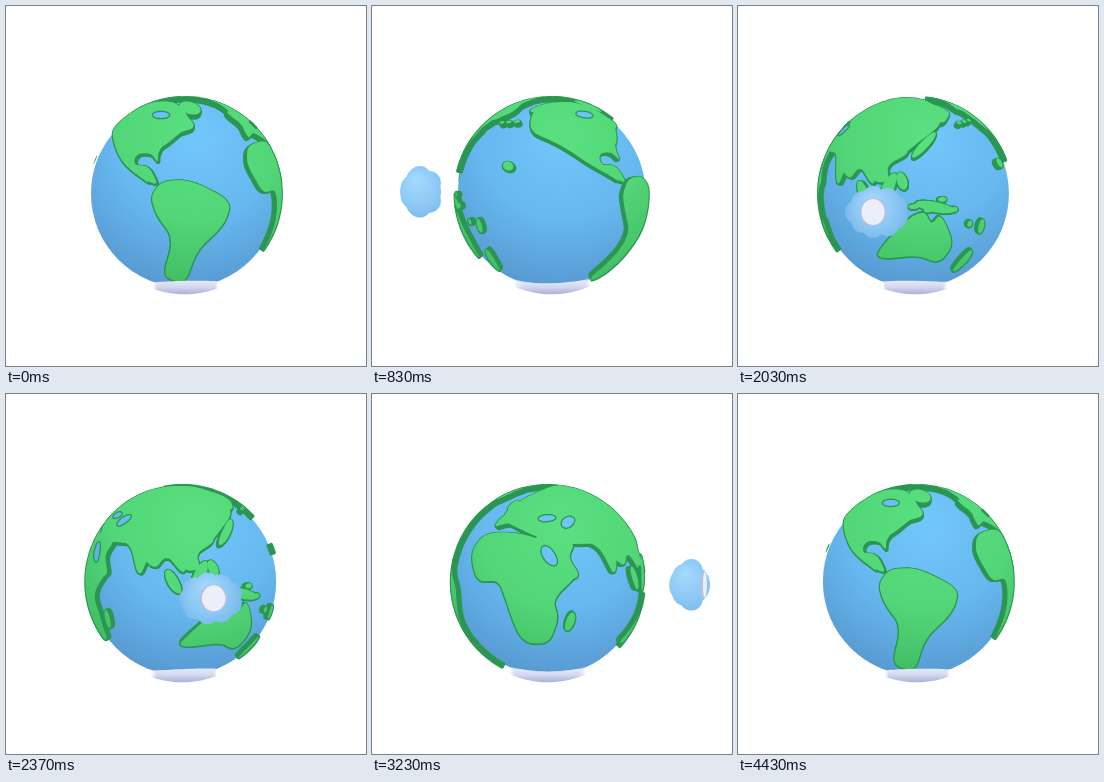
Recreate the animation shown at these times as an HTML page with a canvas. Size 360 px wide and 360 px high, loop 4460 ms.

```html
<!DOCTYPE html>
<html lang="en">
<head>
<meta charset="utf-8">
<title>Turning globe</title>
<style>
html, body { margin: 0; width: 100%; height: 100%; overflow: hidden; background: #fff; }
canvas { display: block; width: 100vw; height: 100vh; }
</style>
</head>
<body>
<canvas id="stage" width="360" height="360"></canvas>
<script>
const ctx = document.getElementById('stage').getContext('2d');
const STEPS = 134, LOOP = 4460, TAU = Math.PI * 2;
const CY = 187.5, SEA = 93.8, TOP = 97, TILT = 0.068;
const ST = Math.sin(TILT), CT = Math.cos(TILT);
const lands = [], lakes = [];

const turnOf = step => step / STEPS * TAU;

// The globe spins about an axis slightly off its middle
const middle = turn => 177.7 + 2 * Math.cos(turn - 1);

function spinY([x, y, z], a) {
  const c = Math.cos(a), s = Math.sin(a);
  return [x * c + z * s, y, z * c - x * s];
}

// Stage position at a given turn step -> point on the unit globe
function lift(step, px, py) {
  const turn = turnOf(step);
  let x = (px - middle(turn)) / TOP, y = (CY - py) / TOP;
  const d = Math.max(1, Math.hypot(x, y) / 0.999);
  x /= d;
  y /= d;
  const z = Math.sqrt(1 - x * x - y * y);
  return spinY([x, y * CT + z * ST, z * CT - y * ST], -turn);
}

// Corner cutting keeps coasts soft
function smooth(pts) {
  return pts.flatMap((p, i) => {
    const q = pts[(i + 1) % pts.length];
    return [0.2, 0.8].map(k => {
      const v = p.map((c, j) => c + (q[j] - c) * k), n = Math.hypot(...v);
      return v.map(c => c / n);
    });
  });
}

function land(step, ...xy) {
  const pts = [];
  for (let i = 0; i < xy.length; i += 2) pts.push(lift(step, xy[i], xy[i + 1]));
  lands.push(smooth(smooth(smooth(pts))));
}

function oval(step, x, y, rx, ry = rx, lean = 0) {
  const c = Math.cos(lean), s = Math.sin(lean);
  return Array.from({ length: 20 }, (_, i) => {
    const u = rx * Math.cos(i / 20 * TAU), v = ry * Math.sin(i / 20 * TAU);
    return lift(step, x + u * c - v * s, y + u * s + v * c);
  });
}
const isle = (...o) => lands.push(oval(...o));
const lake = (...o) => lakes.push(oval(...o));

// North America, east and west, with Greenland
land(0, 108,122, 133,101, 168,96, 178,107, 191,122, 166,129, 152,146, 152,157, 145,147,
  127,148, 126,159, 143,160, 153,180, 135,172, 117,157, 108,136);
land(25, 154,106, 183,112, 190,134, 224,161, 251,179, 228,157, 227,148, 245,140, 240,115, 205,97, 172,98);
isle(0, 184, 102, 11, 6, 0.3);
lake(0, 155, 109, 8, 3);
// South America
land(0, 145,190, 156,175, 184,174, 225,195, 219,217, 190,244, 178,277, 157,270, 168,232, 150,208);
// Africa and Madagascar
land(113, 155,161, 166,142, 206,139, 236,147, 247,170, 262,175, 246,203, 247,222, 231,248,
  210,248, 206,208, 198,187, 171,190);
isle(82, 136, 227, 4, 9);
// Europe and Arabia
land(113, 175,135, 178,123, 192,117, 192,97, 222,102, 252,126, 263,147, 238,150, 226,138, 192,129);
land(82, 112,138, 144,148, 133,163, 142,182, 128,187, 117,158);
isle(113, 181, 112, 4, 5);
lake(113, 223, 123, 6, 3);
lake(113, 239, 126, 3, 6, -0.5);
lake(113, 240, 160, 4, 11, -0.6);
// Asia, middle and east, with Japan
land(82, 136,150, 166,150, 181,186, 190,160, 206,160, 225,181, 225,163, 240,150, 240,116,
  205,94, 155,96, 105,122, 112,141);
land(61, 100,150, 110,128, 140,104, 180,95, 213,106, 206,118, 192,113, 166,136, 171,148,
  149,159, 151,175, 138,177, 122,160, 111,175);
isle(61, 186, 139, 4, 17, 0.75);
// Southern islands
isle(61, 164, 175, 5, 9, -0.3);
isle(61, 197, 201, 20, 5, 0.2);
isle(82, 215, 187, 5, 13, -0.5);
isle(82, 237, 183, 5, 18, 0.2);
for (let i = 0; i < 4; i++) isle(46, 115 + 12 * i, 199 + 6 * Math.sin(2.4 * i), 4, 2.5);
// Australia and the Pacific
land(46, 103,233, 113,209, 124,204, 131,218, 138,207, 158,238, 153,257, 128,247, 106,249);
isle(46, 180, 256, 5, 11, 0.4);
isle(46, 187, 222, 4, 7);
isle(46, 171, 219, 3);
isle(46, 221, 160, 6, 4, 0.5);
for (let i = 0; i < 3; i++) isle(46, 183 + 9 * i, 118 - i, 3, 1.5);

const cap = Array.from({ length: 60 }, (_, i) => {
  const a = i / 60 * TAU, r = 0.39 + 0.04 * Math.cos(2 * a - 0.35);
  return [r * Math.sin(a), -Math.sqrt(1 - r * r), r * Math.cos(a)];
});

function blend(g, ...colors) {
  colors.forEach((c, i) => g.addColorStop(i / (colors.length - 1), c));
  return g;
}
const glow = (...colors) => blend(ctx.createRadialGradient(190, 132, 10, 190, 132, 155), ...colors);
const sea = glow('#70c5f9', '#66b8ef', '#5798d0');
const grass = glow('#59df7f', '#52d677', '#40bb63');
const ice = blend(ctx.createLinearGradient(0, 273, 0, 289), '#e9edf8', '#d3d9ee', '#a4add6');
const cliff = '#2b9652';

function view(pts, turn) {
  return pts.map(p => {
    const [x, y, z] = spinY(p, turn);
    return [x, y * CT - z * ST, y * ST + z * CT];
  });
}

// Points past the limb slide onto it when hugging
function trace(pts, cx, r, hug, drop = 0) {
  ctx.beginPath();
  for (const [x, y, z] of pts) {
    const k = hug && z < 0 ? r / Math.hypot(x, y) : r;
    ctx.lineTo(cx + x * k, CY - y * k + drop);
  }
  ctx.closePath();
}

function disc(x, y, rx, ry, fill) {
  ctx.beginPath();
  ctx.ellipse(x, y, rx, ry, 0, 0, TAU);
  ctx.fillStyle = fill;
  ctx.fill();
}

function drawGlobe(turn) {
  const cx = middle(turn);
  const all = lands.map(p => view(p, turn));
  const facing = pts => pts.some(p => p[2] > 0);
  const front = all.filter(facing);
  ctx.lineJoin = 'round';

  ctx.fillStyle = ctx.strokeStyle = cliff;
  for (const pts of all) { trace(pts, cx, TOP - 1); ctx.fill(); }
  disc(cx, CY, SEA, SEA, sea);

  ctx.lineWidth = 2.6;
  ctx.fillStyle = cliff;
  for (let r = SEA - 1; r < TOP; r++) {
    for (const pts of front) {
      trace(pts, cx, r, true, 0.5);
      ctx.fill();
      ctx.stroke();
    }
  }
  ctx.fillStyle = grass;
  for (const pts of front) { trace(pts, cx, TOP, true); ctx.fill(); }

  ctx.fillStyle = sea;
  for (const pts of lakes.map(p => view(p, turn)).filter(facing)) {
    trace(pts, cx, TOP, true);
    ctx.stroke();
    ctx.fill();
  }

  ctx.fillStyle = ice;
  const ground = view(cap, turn);
  for (let drop = 0; drop <= 7; drop++) {
    trace(ground, cx, SEA, true, drop);
    ctx.fill();
  }
}

const puffs = [[0, 0, 0, 20.5]];
for (let i = 0; i < 9; i++) {
  const a = (i + 0.5) / 9 * TAU;
  puffs.push([21 * Math.cos(a), 14.5 * Math.sin(a), 3 * Math.cos(4 * a), 11.5]);
}

function drawCloud(a) {
  const s = Math.sin(a), c = Math.cos(a);
  const x = 178.5 + 141 * s;
  const y = 188.5 + 14 * c + 3.8 * Math.cos(3 * a) - 2.1 * Math.sin(3 * a);
  const fluff = blend(ctx.createRadialGradient(x - 5, y - 12, 2, x, y, 36), '#a3d8fb', '#8dcaf6', '#74b3e6');
  for (const [u, v, w, r] of puffs) disc(x + u * c + w * s, y + v, r, r, fluff);
  if (c > 0.05) {
    disc(x + 14 * s, y, 13 * c + 1, 14, '#b4bfe2');
    disc(x + 15.5 * s, y, 12 * c, 13, '#eceffa');
  }
}

function draw() {
  const t = performance.now() % LOOP;
  const step = Math.floor((t + 5) * 0.03) % STEPS;
  const orbit = turnOf(step - STEPS / 2);
  const inFront = Math.cos(orbit) > 0;
  ctx.clearRect(0, 0, 360, 360);
  if (!inFront) drawCloud(orbit);
  drawGlobe(turnOf(step));
  if (inFront) drawCloud(orbit);
  requestAnimationFrame(draw);
}
draw();
</script>
</body>
</html>
```
